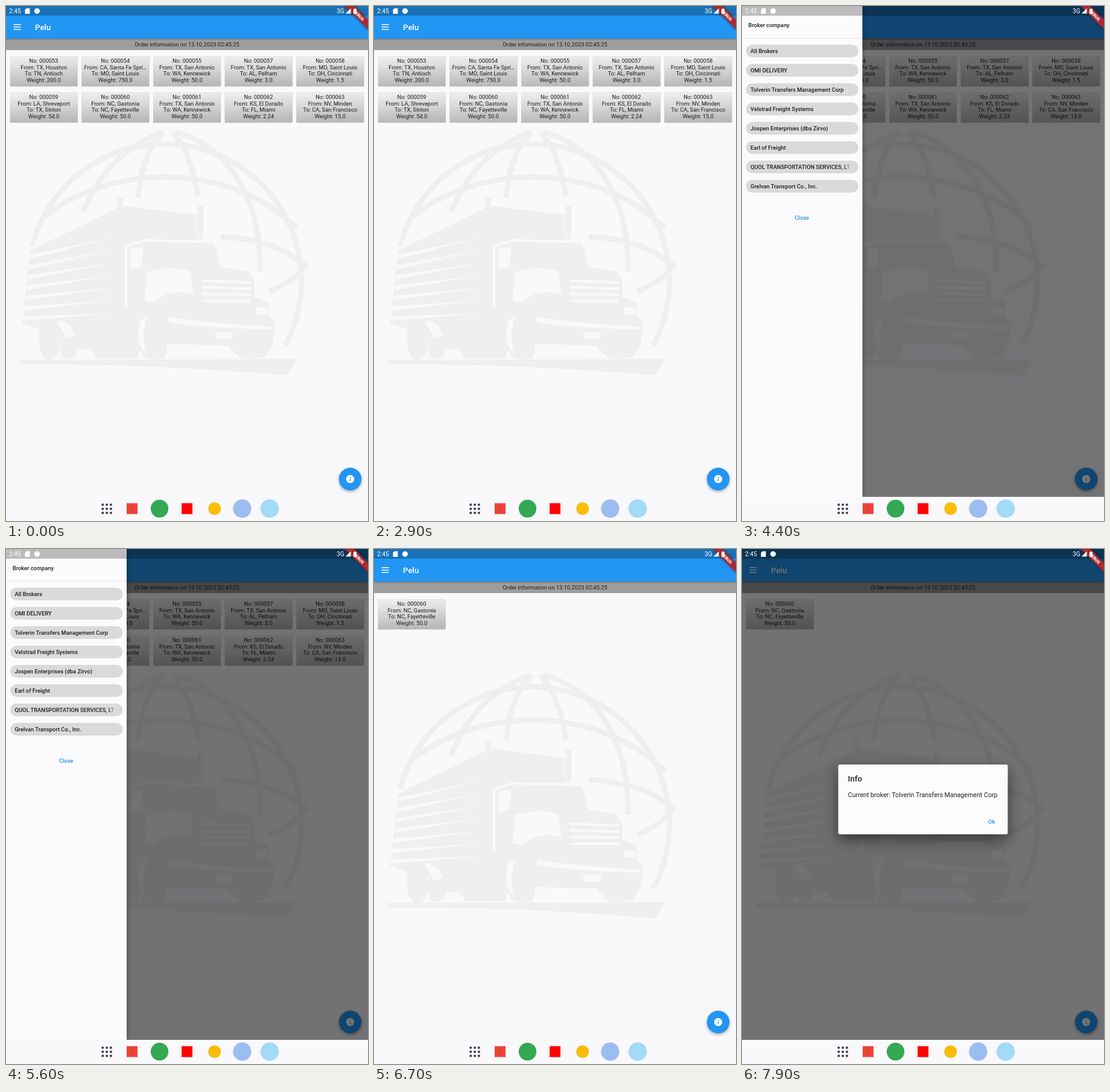
Write an HTML page that moves like this. It is 600 px wide and 853 px high and loops after 8000 ms.

```html
<!DOCTYPE html>
<html lang="en">
<head>
<meta charset="utf-8">
<title>Orders</title>
<style>
  html, body { margin: 0; width: 100%; height: 100%; overflow: hidden; background: #f9f8fb; }
  svg { display: block; width: 600px; height: 853px; }
  text { font-family: Roboto, "Open Sans", sans-serif; font-size: 9.33px; fill: #1d1d1f; }
  .mid { text-anchor: middle; }
  .bold { font-weight: 500; }
  .title { font-size: 13.33px; font-weight: 500; }
  .blue { fill: #2196f3; }
  .white { fill: #fff; }
  .shade { fill: #efeef1; }
  .lit { fill: #f9f8fb; }
  .line { fill: none; stroke: #f9f8fb; stroke-width: 4; }
  .globe path { fill: none; stroke: #efeef1; stroke-width: 9; }
  .bar { filter: drop-shadow(0 1px 1.5px rgba(0,0,0,.35)); }
  .card { filter: drop-shadow(0 .5px .7px rgba(0,0,0,.25)); }
  .fab { filter: drop-shadow(0 2px 2.5px rgba(0,0,0,.35)); }
  .sheet { filter: drop-shadow(1px 0 4px rgba(0,0,0,.3)); }
  .box { filter: drop-shadow(0 9px 11px rgba(0,0,0,.5)); }
  .ribbon { filter: drop-shadow(0 0 2px rgba(0,0,0,.5)); }
</style>
</head>
<body>
<svg viewBox="0 0 600 853">
  <defs>
    <linearGradient id="metal" x1="0" y1="0" x2=".12" y2="1">
      <stop offset="0" stop-color="#f0eff1"/>
      <stop offset=".45" stop-color="#d9d8da"/>
      <stop offset="1" stop-color="#b9b8ba"/>
    </linearGradient>
    <linearGradient id="fade" gradientUnits="userSpaceOnUse" x1="170" y1="0" x2="181" y2="0">
      <stop offset="0" stop-color="#1d1d1f"/>
      <stop offset="1" stop-color="#1d1d1f" stop-opacity="0"/>
    </linearGradient>
    <clipPath id="app"><rect width="600" height="813"/></clipPath>
    <clipPath id="label"><rect width="180" height="813"/></clipPath>
  </defs>

  <rect width="600" height="853" fill="#f9f8fb"/>

  <g clip-path="url(#app)">
    <g class="globe">
      <path d="M43 398A227 227 0 1 1 463 562"/>
      <path d="M258 209Q165 245 128 342"/>
      <path d="M262 209Q226 240 219 318"/>
      <path d="M276 209Q308 245 318 316"/>
      <path d="M281 209C372 232 424 325 421 440"/>
      <path d="M64 348Q150 283 270 283Q400 288 482 368"/>
      <path d="M356 382Q446 386 496 430Q476 458 436 473"/>
    </g>
    <g class="shade">
      <path d="M184 335L40 405L27 525L55 535V545H215V335Z"/>
      <path d="M195 331L316 346V388L228 388L200 398Z"/>
      <path d="M184 318h10V440h-10ZM317 332h10V386h-10Z"/>
      <path d="M198 396L228 386L346 389L357 432L402 440L412 456V482L436 491V514L447 526L441 562L428 582H386L368 562L268 560L262 584L228 582L200 535Z"/>
      <path d="M22 586L482 585L466 612Q240 592 22 594Z"/>
      <path d="M118 540H220V583H152L140 568H118Z"/>
      <ellipse cx="72" cy="558" rx="17" ry="29"/>
      <ellipse cx="104" cy="560" rx="16" ry="25"/>
      <ellipse cx="243" cy="545" rx="25" ry="41"/>
      <ellipse cx="402" cy="567" rx="24" ry="18"/>
    </g>
    <g class="lit">
      <g id="slats"></g>
      <path d="M207 402L227 399L225 431L206 436Z"/>
      <path d="M234 441Q275 428 306 440L311 478Q272 466 246 490L230 488Z"/>
      <path d="M84 522Q102 516 115 545L100 550Z"/>
      <path d="M270 515Q330 525 442 531V536Q330 533 270 524Z"/>
      <path d="M346 540H376V551H348ZM414 499H434V511H416Z"/>
      <path d="M222 522Q214 560 232 576Q223 545 235 512Z"/>
    </g>
    <g class="line">
      <path d="M199 500V398L230 388L346 391L358 432"/>
      <path id="grille"/>
    </g>

    <rect y="54" width="600" height="19" fill="#9e9e9e"/>
    <text class="mid" x="300" y="66.5">Order information on 13.10.2023 02:45:25</text>
    <g class="bar"><rect width="600" height="54" fill="#2196f3"/></g>
    <path d="M12.5 30.7h12M12.5 34.7h12M12.5 38.7h12" stroke="#fff" stroke-width="1.4"/>
    <text class="title white" x="48" y="39.6">Pelu</text>

    <g id="all"></g>
    <g id="one"></g>

    <g class="fab"><circle cx="570.5" cy="783.5" r="18.7" fill="#2196f3"/></g>
    <circle cx="570.5" cy="783.5" r="6.7" fill="#fff"/>
    <path d="M570.5 779.9v1.5M570.5 782.7v4.2" stroke="#2196f3" stroke-width="1.5"/>

    <rect id="scrim" width="600" height="813"/>

    <g id="drawer">
      <g class="sheet"><rect width="200" height="813" fill="#fbfafc"/></g>
      <text class="bold" x="11" y="35.4">Broker company</text>
      <rect y="53" width="200" height=".7" fill="#dfdee0"/>
      <g id="brokers"></g>
      <text class="bold blue mid" x="99.7" y="354">Close</text>
    </g>

    <g id="dialog">
      <g class="box"><rect x="159.5" y="357" width="281" height="115.5" rx="2.7" fill="#fdfcfd"/></g>
      <text class="title" x="175.5" y="385">Info</text>
      <text id="current" x="175.5" y="411.3" style="font-size:10.67px"></text>
      <text class="bold blue" x="408" y="454.6">Ok</text>
    </g>

    <rect width="600" height="16" fill-opacity=".25"/>
    <g transform="translate(600 0) rotate(45)">
      <g class="ribbon"><rect x="-28" y="16" width="56" height="11.5" fill="#a82a30"/></g>
      <text class="mid white" y="24.3" style="font-size:7px;font-weight:900">DEBUG</text>
    </g>
    <g class="white">
      <text class="white" x="5" y="12" style="font-size:10.2px">2:45</text>
      <path d="M34 3.8h5.5v9.2h-8V6.3Z"/>
      <circle cx="51.5" cy="8.3" r="4.6"/>
      <text class="white" x="548" y="12" style="font-size:10.2px">3G</text>
      <path d="M571.5 3.8V12.5H562.8Z"/>
      <path d="M576 5h1.5v-1h2v1h1.5v8h-5Z"/>
    </g>
  </g>

  <g id="dots" fill="#44464f"></g>
  <rect x="200" y="823.5" width="18" height="18" fill="#ea4335"/>
  <circle cx="254.5" cy="832.5" r="14.7" fill="#34a853"/>
  <rect x="291" y="823.5" width="18" height="18" fill="#f00"/>
  <circle cx="345.7" cy="832.5" r="10.5" fill="#fbbc04"/>
  <circle cx="391.5" cy="832.5" r="15.2" fill="#9dbdf0"/>
  <circle cx="437" cy="832.5" r="15.2" fill="#a3daf6"/>
</svg>

<script>
const LOOP = 8000, STEP = 100;
const OPEN_AT = 4025, PICK_AT = 5863, INFO_AT = 7650, FADE = 150;
const SCRIM = 0.54;

const orders = [
  ["000053", "TX, Houston", "TN, Antioch", "200.0"],
  ["000054", "CA, Santa Fe Spri…", "MO, Saint Louis", "750.0"],
  ["000055", "TX, San Antonio", "WA, Kennewick", "50.0"],
  ["000057", "TX, San Antonio", "AL, Pelham", "3.0"],
  ["000058", "MO, Saint Louis", "OH, Cincinnati", "1.5"],
  ["000059", "LA, Shreveport", "TX, Sinton", "54.0"],
  ["000060", "NC, Gastonia", "NC, Fayetteville", "50.0"],
  ["000061", "TX, San Antonio", "WA, Kennewick", "50.0"],
  ["000062", "KS, El Dorado", "FL, Miami", "2.24"],
  ["000063", "NV, Minden", "CA, San Francisco", "15.0"]
];
const brokers = [
  "All Brokers", "OMI DELIVERY", "Tolverin Transfers Management Corp",
  "Velstrad Freight Systems", "Jospen Enterprises (dba Zirvo)", "Earl of Freight",
  "QUOL TRANSPORTATION SERVICES, LTD", "Grelvan Transport Co., Inc."
];

const el = id => document.getElementById(id);
const repeat = (n, make) => Array.from({ length: n }, (_, i) => make(i)).join("");

function card([no, from, to, weight], i) {
  const x = 6.8 + (i % 5) * 118.65, y = 83.5 + Math.floor(i / 5) * 60;
  const lines = [`No: ${no}`, `From: ${from}`, `To: ${to}`, `Weight: ${weight}`];
  return `<g class="card"><rect x="${x}" y="${y}" width="112" height="49.7" fill="url(#metal)"/></g>` +
    lines.map((s, k) =>
      `<text class="mid" x="${x + 55.8}" y="${y + 10.6 + k * 10.67}">${s}</text>`).join("");
}

function chip(name, i) {
  const y = 74.5 + i * 32;
  const fill = name.length > 30 && name === name.toUpperCase() ? ' style="fill:url(#fade)"' : "";
  return `<rect x="7" y="${y - 10.5}" width="186.5" height="21" rx="10.5" fill="#dad9db"/>` +
    `<text class="bold" clip-path="url(#label)" x="14.5" y="${y + 3.4}"${fill}>${name}</text>`;
}

function slat(i) {
  const x = 40 - i * 2, y = 412 + i * 17;
  return `<path d="M${x} ${y}L178 ${383 + i * 21}L${x} ${y + 7}Z"/>`;
}

el("all").innerHTML = orders.map(card).join("");
el("one").innerHTML = card(orders[6], 0);
el("brokers").innerHTML = brokers.map(chip).join("");
el("slats").innerHTML = repeat(7, slat);
el("grille").setAttribute("d", repeat(4, i => `M324 ${455 + i * 11}L406 ${458 + i * 10}`));
el("current").textContent = "Current broker: " + brokers[2];
el("dots").innerHTML = repeat(9, i =>
  `<circle cx="${160.3 + (i % 3) * 6.8}" cy="${826 + Math.floor(i / 3) * 6.8}" r="2.1"/>`);

// Critically damped spring: starts at 1, settles to 0.
function spring(ms) {
  const k = Math.max(0, ms) * 0.0224;
  return (1 + k) * Math.exp(-k);
}

function drawerAt(t) {
  const v = t < PICK_AT ? 1 - spring(t - OPEN_AT) : spring(t - PICK_AT);
  return v < 0.004 ? 0 : v;
}

function show(id, on) {
  el(id).style.display = on ? "" : "none";
}

function draw(now) {
  const t = Math.floor((now % LOOP) / STEP) * STEP;
  const open = drawerAt(t);
  const info = Math.min(1, Math.max(0, (t - INFO_AT) / FADE));
  show("all", t < PICK_AT);
  show("one", t >= PICK_AT);
  show("drawer", open > 0);
  el("drawer").setAttribute("transform", `translate(${200 * (open - 1)} 0)`);
  show("dialog", info > 0);
  el("dialog").style.opacity = info;
  el("scrim").style.opacity = SCRIM * Math.max(open, info);
}

const start = performance.now();
function tick() {
  draw(performance.now() - start);
  requestAnimationFrame(tick);
}
tick();
</script>
</body>
</html>
```
